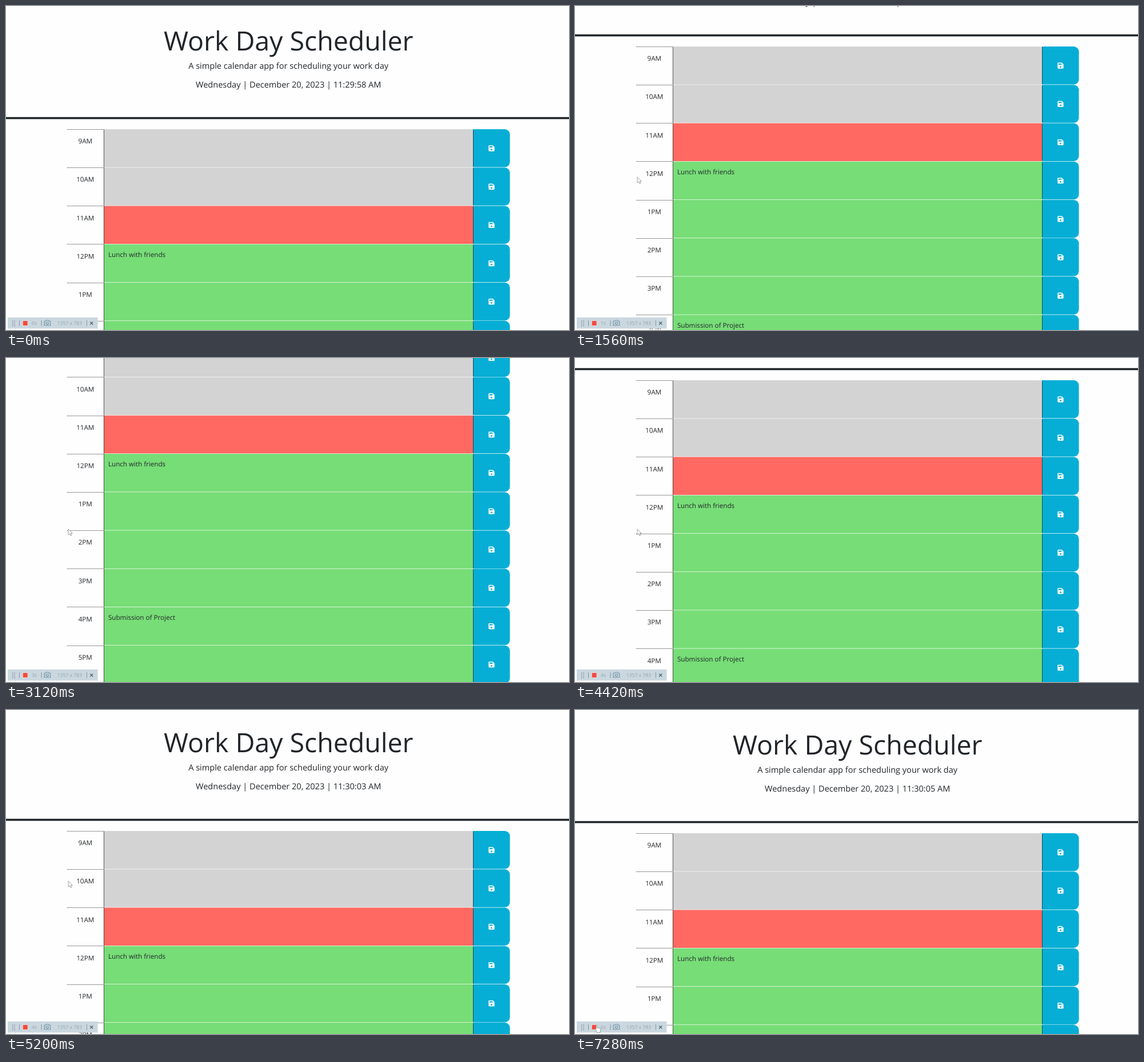
Write an HTML page that moves like this. It is 985 by 568 pixels and loops after 7.41 s.

```html
<!DOCTYPE html>
<html lang="en">
<head>
<meta charset="utf-8">
<title>Work Day Scheduler</title>
<style>
  html, body { margin: 0; width: 100%; height: 100%; overflow: hidden; background: #fefefe; }
  svg { display: block; width: 100vw; height: 100vh; }
  text { font-family: "Open Sans", "Noto Sans", sans-serif; fill: #212529; text-rendering: geometricPrecision; white-space: pre; }
  .mid { text-anchor: middle; }
  .bar text { font-size: 8.6px; fill: #96a3ab; }
</style>
</head>
<body>
<svg id="stage" viewBox="0 0 985 568" preserveAspectRatio="none"></svg>
<script>
const LOOP = 7410, STEP = 130;
const PITCH = 67.2, TOP = 216.1, CENTER = 494.2;
const PAST = '#d3d3d3', NOW = '#ff6961', NEXT = '#77dd77', BLUE = '#06aed5';
const stage = document.getElementById('stage');

function add(parent, tag, attrs, content) {
  const el = document.createElementNS('http://www.w3.org/2000/svg', tag);
  for (const k in attrs) el.setAttribute(k, attrs[k]);
  if (content !== undefined) el.textContent = content;
  parent.appendChild(el);
  return el;
}

const label = (parent, x, y, size, str, cls = '') =>
  add(parent, 'text', { x, y, 'font-size': size, class: cls }, str);

const rect = (parent, x, y, width, height, fill) =>
  add(parent, 'rect', { x, y, width, height, fill });

// Page
const page = add(stage, 'g', {});
label(page, CENTER, 77.8, 46.45, 'Work Day Scheduler', 'mid');
label(page, CENTER, 109.5, 14.52, 'A simple calendar app for scheduling your work day', 'mid');
const clock = label(page, CENTER, 143, 14.52, '', 'mid');
rect(page, 0, 194.7, 985, 3.6, '#222529');

const SAVE = 'M48 32H319l129 129V432a48 48 0 0 1-48 48H48a48 48 0 0 1-48-48V80a48 48 0 0 1 48-48z' +
  'M64 96V192H304V96zM224 288a64 64 0 1 0 .1 0z';

function addRow(i, hour, color, note) {
  const g = add(page, 'g', { transform: `translate(0 ${(TOP + i * PITCH).toFixed(2)})` });
  add(g, 'path', {
    d: 'M107 .2H171', stroke: '#333', 'stroke-width': 1, 'stroke-dasharray': '1 1', 'shape-rendering': 'crispEdges'
  });
  label(g, 138.8, 25, 11.61, hour, 'mid');
  rect(g, 171, 0, 646.5, 66.5, color);
  rect(g, 170.9, 0, 0.8, PITCH, '#333');
  if (note) label(g, 179, 22, 11.61, note);
  add(g, 'path', { d: 'M817.4 0H872.6a9 9 0 0 1 9 9V57.5a9 9 0 0 1-9 9H817.4z', fill: BLUE });
  rect(g, 817, 0.8, 0.9, 65, '#123c48');
  add(g, 'path', {
    d: SAVE, fill: '#fff', 'fill-rule': 'evenodd', transform: 'translate(849.5 33.4) scale(.0232) translate(-224 -256)'
  });
}

const notes = { 3: 'Lunch with friends', 7: 'Submission of Project' };
for (let i = 0; i < 9; i++) {
  const h = 9 + i;
  addRow(i, (h > 12 ? h - 12 : h) + (h < 12 ? 'AM' : 'PM'), i < 2 ? PAST : i < 3 ? NOW : NEXT, notes[i]);
}

// Recorder bar
const bar = add(stage, 'g', { class: 'bar' });
rect(bar, 3, 546, 157.5, 19.5, '#cad7df');
for (let i = 0; i < 10; i++) rect(bar, 11 + (i % 2) * 3.4, 551 + (i >> 1) * 2.4, 1.3, 1.3, '#7f8f99');
for (const x of [23, 61.5, 140.8]) rect(bar, x, 551, 0.9, 10, '#7d8d97');
rect(bar, 29.2, 551.6, 9, 9, '#fff0ee');
rect(bar, 29.7, 552.1, 8, 8, '#f4483f');
const timer = label(bar, 45, 559, 8.6, '');
add(bar, 'path', {
  d: 'M67 552.5H69.3L70.2 551H74.4L75.3 552.5H77.6V560H67z', fill: 'none', stroke: '#7195a8', 'stroke-width': 1.2
});
add(bar, 'circle', { cx: 72.3, cy: 556.1, r: 2.1, fill: 'none', stroke: '#7195a8', 'stroke-width': 1.2 });
label(bar, 89.7, 559, 8.6, '1357 x 783');
add(bar, 'path', { d: 'M147.2 553.5l5 5m0-5l-5 5', stroke: '#516572', 'stroke-width': 1.3 });

// Pointers, both with the tip at 0,0
const outline = { fill: '#fff', stroke: '#85898c', 'stroke-width': 0.8, 'stroke-linejoin': 'round' };
const arrow = add(stage, 'path', { ...outline, d: 'M0 0V10.3L2.4 8.2 4.1 12 5.8 11.2 4.2 7.6H7.3z' });
const hand = add(stage, 'path', {
  ...outline,
  d: 'M-1 .6Q0-.8 1 .6V5L5 5.7Q7 6 6.8 8L6 12V13.5H.4V12L-3.2 8Q-3.5 6.6-2.2 6.9L-1 8z'
});

// Value at t along [time, value] points
function track(points, t, ease = u => u) {
  if (t <= points[0][0]) return points[0][1];
  for (let i = 1; i < points.length; i++) {
    const [t0, a] = points[i - 1], [t1, b] = points[i];
    if (t <= t1) return a + (b - a) * ease((t - t0) / (t1 - t0));
  }
  return points[points.length - 1][1];
}

const smooth = u => u * u * (3 - 2 * u);
const count = (ticks, t) => ticks.filter(x => x <= t).length;

const SCROLL = [
  [910, 0], [1040, 3], [1170, 15], [1300, 37.7], [1430, 80], [1560, 145], [1690, 203], [1820, 217],
  [1950, 225.1], [2080, 241], [2210, 249.7], [4030, 249.7], [4160, 236], [4290, 198], [4420, 177],
  [4680, 177], [4810, 158], [4940, 105], [5070, 42], [5200, 4], [5330, 0]
];
const MOVE_X = [[0, 40], [650, 109], [5980, 109], [6760, 40], [7280, 38]];
const MOVE_Y = [[0, 552], [650, 299.8], [5980, 299.8], [6760, 554], [7280, 552]];
const CLOCK_TICKS = [1040, 2080, 3120, 3900, 4810, 5850, 6890];
const TIMER_TICKS = [1040, 2080, 3120, 4160, 5330, 6240];

function draw(ms) {
  const t = Math.floor((ms % LOOP) / STEP) * STEP;
  page.setAttribute('transform', `translate(0 ${-track(SCROLL, t)})`);

  const sec = 58 + count(CLOCK_TICKS, t);
  const time = `11:${29 + Math.floor(sec / 60)}:${String(sec % 60).padStart(2, '0')} AM`;
  clock.textContent = `Wednesday | December 20, 2023 | ${time}`;
  timer.textContent = count(TIMER_TICKS, t) + 's';

  const at = `translate(${track(MOVE_X, t, smooth)} ${track(MOVE_Y, t, smooth)})`;
  const over = t >= 6760;
  arrow.setAttribute('transform', at);
  hand.setAttribute('transform', at);
  arrow.setAttribute('visibility', t > 0 && !over ? 'visible' : 'hidden');
  hand.setAttribute('visibility', over ? 'visible' : 'hidden');
}

const start = performance.now();
function loop() {
  draw(performance.now() - start);
  requestAnimationFrame(loop);
}
loop();
</script>
</body>
</html>
```
